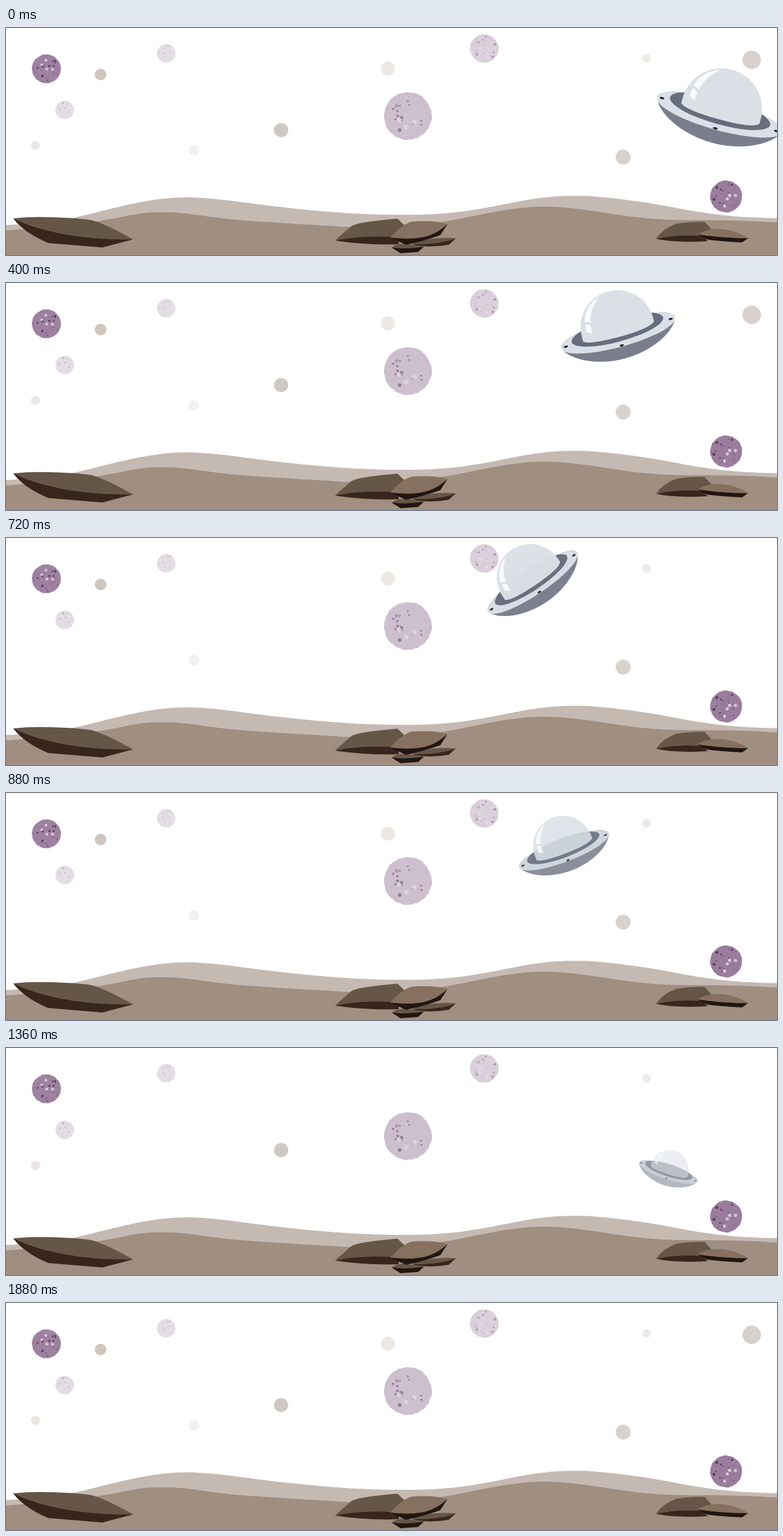
An HTML page for the animation above (1.92 s loop, 1280x378 px).

```html
<!DOCTYPE html>
<html lang="en">
<head>
<meta charset="utf-8">
<title>Saucer over the desert</title>
<style>
html, body { margin: 0; width: 100%; height: 100%; overflow: hidden; background: #fff; }
svg { display: block; width: 100%; height: 100%; }
.light { fill: #665648; }
.dark { fill: #38251b; }
.brown { fill: #86705f; }
.black { fill: #211611; }
</style>
</head>
<body>
<svg viewBox="0 0 1280 378">
  <circle cx="1063.5" cy="50.5" r="7.3" fill="#eeeae6"/>
  <g id="early">
    <circle cx="49" cy="195.5" r="7.5" fill="#eae6e4"/>
    <circle cx="456.7" cy="170" r="11.8" fill="#d0c8c3"/>
  </g>
  <g id="late">
    <circle cx="157" cy="77.5" r="9.7" fill="#cfc6bf"/>
    <circle cx="634" cy="67.5" r="11.5" fill="#ede8e4"/>
    <circle cx="311.7" cy="203.5" r="9" fill="#f2f0f1"/>
    <circle cx="1024.5" cy="215" r="12.4" fill="#d9d2cc"/>
  </g>
  <circle id="long" cx="1238" cy="53" r="15.3" fill="#d8d0ce"/>

  <g id="asteroids"></g>

  <path fill="#c5bab2" d="M0 328C90 325 125 313 170 302S255 282 300 282S400 292 460 298.5S580 311 660 311S780 303 840 291S925 279.5 954 279.5S1060 289 1110 299S1210 316 1280 316.5V378H0Z"/>
  <path fill="#a08e81" d="M0 337C60 333 150 324 190 315S240 307 270 307S340 316 390 320S500 327 560 331S690 329 735 321S840 297.5 890 297.5S980 306 1030 313S1120 320 1160 320S1240 321 1280 324V378H0Z"/>

  <g id="rocks">
    <path class="dark" d="M12 317Q30 341 70 358L160 365.5L211 352L100 325Z"/>
    <path class="light" d="M12 317Q40 314 70 315Q120 316 142 320Q165 326 211 352C150 354 65 344 12 317Z"/>
    <path class="dark" d="M546 354Q600 340 652 348V360Q600 362 546 354Z"/>
    <path class="light" d="M546 354L572 331Q580 323 650 317.5L665 332L640 348Q590 345 546 354Z"/>
    <path class="light" d="M640 365.5Q652 357 668 360L694 364Q670 369 640 365.5Z"/>
    <path class="black" d="M640 365.5Q668 369 694 364L684 373L655 375Z"/>
    <path class="dark" d="M674 360Q715 357 747 350L735 361Q700 367 674 360Z"/>
    <path class="light" d="M674 360Q700 347 747 350Q722 361 674 360Z"/>
    <path class="black" d="M638 349Q690 346 733 326.5L721 345Q690 356 664 361Z"/>
    <path class="brown" d="M638 349Q655 329 671 323Q705 319 733 326.5Q718 340 704 345Q680 354 638 349Z"/>
    <path class="dark" d="M1079 351Q1120 342 1155 346L1165 355Q1110 358 1079 351Z"/>
    <path class="light" d="M1079 351Q1092 333 1113 326Q1140 322 1160 323L1171 335L1150 346Q1110 344 1079 351Z"/>
    <path class="black" d="M1148 343.5Q1190 349 1232 350L1222 357Q1180 355 1163 352Z"/>
    <path class="brown" d="M1148 343.5Q1165 333 1190 335Q1215 338 1232 350Q1185 350 1148 343.5Z"/>
  </g>

  <path id="route" fill="none" d="M1184 144Q1144 119 1102.5 107C1050 92 990 72 945 72C912 72 869 66 869 80S905 91 928 95.5S1000 110 1029.5 127S1075 192 1097 205S1195 222 1235.5 239S1300 285 1330 302"/>

  <g id="ufo">
    <path fill="#7a7e8c" d="M-102.5 0C-96 22 -52 46.5 0 46.5S96 22 102.5 0A102.5 24 0 0 0 -102.5 0Z"/>
    <ellipse fill="#dbe0e8" cy=".5" rx="102.5" ry="24.5"/>
    <ellipse fill="#676d7c" cy="-5.5" rx="82.5" ry="21"/>
    <path fill="#dbe0e7" d="M-63 -10A64.2 64.2 0 0 1 65.5 -10V-3Q56 7.5 1 7.5Q-53 7.5 -63 -1Z"/>
    <path fill="#f9fbfc" d="M-17 -68C-35 -64 -47 -50 -51.5 -34L-42 -29.5C-39 -44 -31 -57 -17 -68ZM-51.5 -30L-43 -25L-44 -10.5L-53.5 -16Z"/>
    <g fill="#23252d">
      <ellipse cx="-94.5" cy="-.5" rx="3.7" ry="1.8"/>
      <ellipse cy="23" rx="3.7" ry="1.8"/>
      <ellipse cx="94.5" cy="1" rx="3.7" ry="1.8"/>
    </g>
  </g>
</svg>
<script>
const LOOP = 1920, STEP = 40, TURN = 680, SPEED = .448;
const $ = id => document.getElementById(id);

let seed = 7;
const random = () => (seed = seed * 16807 % 2147483647) / 2147483647;

// A ragged disc with scattered craters; strength fades all of its colours.
function asteroid(x, y, r, strength) {
  const edge = Array.from({ length: 60 }, (_, i) => {
    const a = i * Math.PI / 30, q = r * (1.01 - .035 * random());
    return [q * Math.cos(a), q * Math.sin(a)].map(v => v.toFixed(1));
  });
  const spots = (count, fill, opacity, size) => Array.from({ length: count }, () => {
    const a = random() * 2 * Math.PI, d = r * .85 * Math.sqrt(random());
    return `<circle cx="${d * Math.cos(a)}" cy="${d * Math.sin(a)}" r="${size()}" fill="${fill}" fill-opacity="${opacity}"/>`;
  }).join('');
  return `<g transform="translate(${x} ${y})">`
    + `<polygon points="${edge.join(' ')}" fill="#987a9b" fill-opacity="${strength}"/>`
    + spots(14, '#56365c', strength, () => r * (.03 + .06 * random() ** 2))
    + (r > 20 ? spots(4, '#fff', .6 * strength, () => r * .1) : '')
    + '</g>';
}

$('asteroids').innerHTML = asteroid(67, 68, 24.2, .94)
  + asteroid(266, 42, 15.5, .26)
  + asteroid(97.5, 136.5, 15.5, .26)
  + asteroid(794, 34, 23.8, .36)
  + asteroid(667, 146.5, 40, .48)
  + asteroid(1195.5, 280.5, 26.7, .98);

function hide(id, hidden) {
  $(id).style.visibility = hidden ? 'hidden' : 'visible';
}

function draw() {
  const t = Math.floor((performance.now() + 6) % LOOP / STEP) * STEP;
  const before = Math.min(t, TURN), after = t - before;
  const { x, y } = $('route').getPointAtLength(SPEED * t);
  const angle = 15.7 - .0775 * before + .0807 * after;
  const scale = 1.045 - .00023 * before - .000575 * after;
  $('ufo').setAttribute('transform', `translate(${x} ${y}) rotate(${angle}) scale(${scale})`);
  $('ufo').setAttribute('fill-opacity', 1 - .00067 * after);

  const quarter = Math.floor(4 * t / LOOP);
  hide('early', quarter === 1);
  hide('late', quarter === 2);
  hide('long', quarter === 1 || quarter === 2);
  requestAnimationFrame(draw);
}
draw();
</script>
</body>
</html>
```
